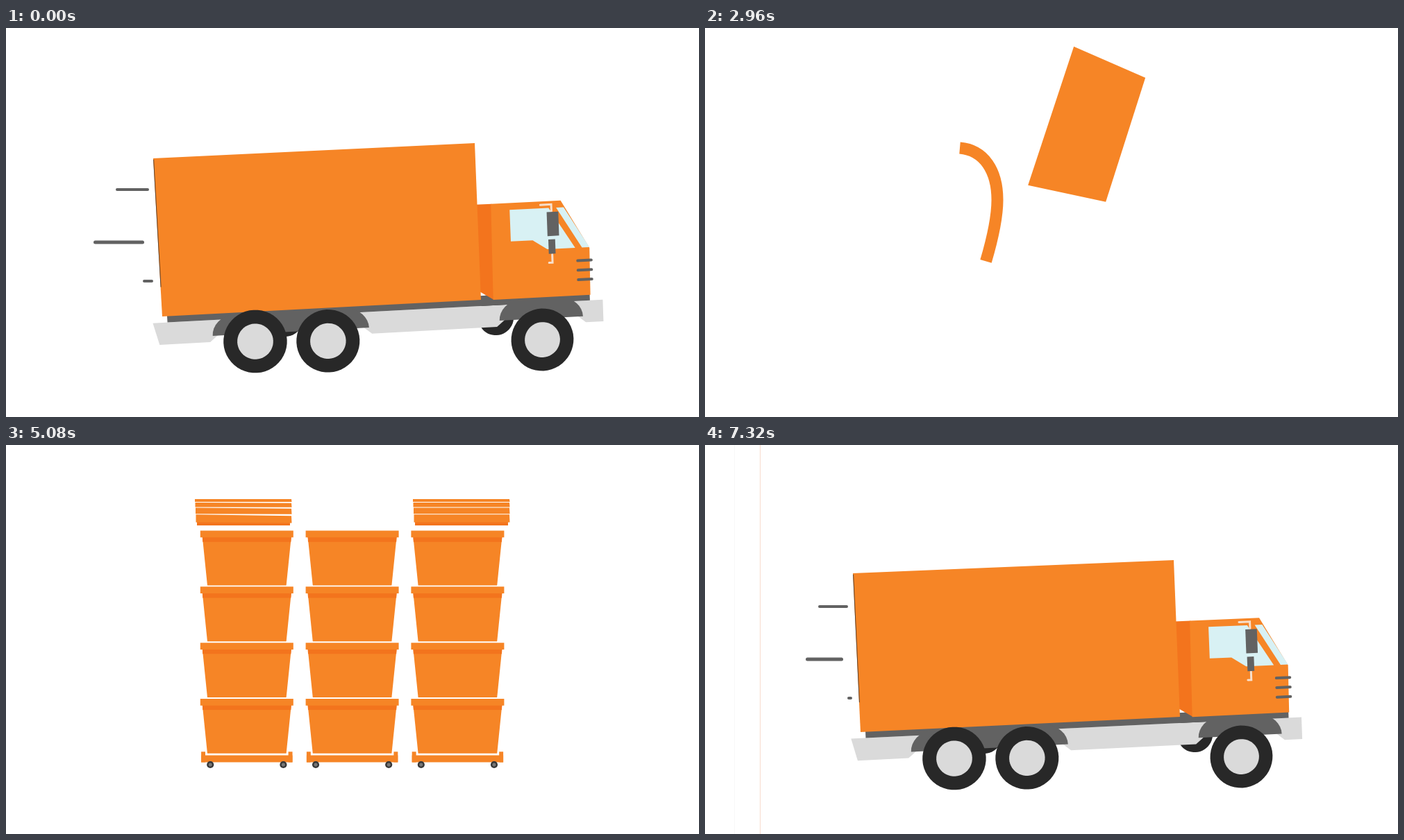
These frames come from a looping animation (998 by 561 pixels, 7.36 s). An HTML page with a canvas:

```html
<!DOCTYPE html>
<html lang="en">
<head>
<meta charset="utf-8">
<title>Moving day</title>
<style>
html, body { margin: 0; width: 100%; height: 100%; overflow: hidden; background: #fff; }
canvas { display: block; width: 998px; height: 561px; }
</style>
</head>
<body>
<canvas id="stage" width="998" height="561"></canvas>
<script>
const ctx = document.getElementById('stage').getContext('2d');
const W = 998, H = 561, LOOP = 7360, STEP = 40;
const ORANGE = '#f68526', DEEP = '#f3741d', DARK = '#282828', GREY = '#626262', PALE = '#dadada', GLASS = '#d8f1f4';

const clamp = v => Math.max(0, Math.min(1, v));
const span = (t, a, b) => clamp((t - a) / (b - a));
const mix = (a, b, p) => a + (b - a) * p;
const sine = p => (1 - Math.cos(Math.PI * p)) / 2;
const easeOut = p => 1 - (1 - p) ** 3;
const mixAll = (a, b, p) => a.map((q, i) => [mix(q[0], b[i][0], p), mix(q[1], b[i][1], p)]);

function poly(points, color) {
  ctx.beginPath();
  points.forEach(([x, y]) => ctx.lineTo(x, y));
  ctx.closePath();
  ctx.fillStyle = color;
  ctx.fill();
}

function line(points, color, width) {
  ctx.beginPath();
  points.forEach(([x, y]) => ctx.lineTo(x, y));
  ctx.strokeStyle = color;
  ctx.lineWidth = width;
  ctx.lineCap = 'round';
  ctx.stroke();
}

function disc(x, y, r, color) {
  ctx.beginPath();
  ctx.arc(x, y, r, 0, 7);
  ctx.fillStyle = color;
  ctx.fill();
}

function zoomAt(x, y, scale) {
  ctx.translate(x, y);
  ctx.scale(scale, scale);
  ctx.translate(-x, -y);
}

// Perspective map from a w by h rectangle to a quad
function project([[x0, y0], [x1, y1], [x2, y2], [x3, y3]], w = 1, h = 1) {
  const ax = x1 - x2, bx = x3 - x2, ay = y1 - y2, by = y3 - y2;
  const sx = x0 - x1 + x2 - x3, sy = y0 - y1 + y2 - y3;
  const den = ax * by - bx * ay;
  const g = (sx * by - bx * sy) / den, k = (ax * sy - sx * ay) / den;
  return ([x, y]) => {
    const u = x / w, v = y / h, z = g * u + k * v + 1;
    return [((x1 - x0 + g * x1) * u + (x3 - x0 + k * x3) * v + x0) / z,
            ((y1 - y0 + g * y1) * u + (y3 - y0 + k * y3) * v + y0) / z];
  };
}

const rect = (x, y, w, h) => [[x, y], [x + w, y], [x + w, y + h], [x, y + h]];
const circle = (x, y, r) => Array.from({ length: 48 }, (_, i) => {
  const a = i * Math.PI / 24;
  return [x + r * Math.cos(a), y + r * Math.sin(a)];
});

// Cargo box: size in truck units, and its side on the stage
const BOX_W = 463, BOX_H = 228;
const REST = [[212, 188], [675, 166], [684, 392], [225, 416]];
const TURN = [[371, 110], [984, 134], [975, 432], [374, 474]];
const EDGE = [[906, -40], [910, 20], [910, 540], [906, 600]];
const ARCHES = [[71, 298], [489, 612]];
const WHEELS = [132, 237.5, 551];

function arch([x0, x1]) {
  const pts = [];
  for (let a = 0; a <= 90; a += 10) {
    const r = a * Math.PI / 180;
    pts.push([x0 + 38 * (1 - Math.cos(r)), 260 - 31 * Math.sin(r)]);
  }
  return pts.concat(pts.map(([x, y]) => [x0 + x1 - x, y]).reverse());
}

// tilt: how far the body leans back over its wheels; lift: height of the tail
function truck(quad, tilt, lift) {
  const ground = project(quad, BOX_W, BOX_H);
  const [a, b, c, d] = quad;
  const body = project([[a[0] - lift / 3, a[1] + lift], b, c, [d[0] + lift / 3, d[1] + lift * .7]], BOX_W, BOX_H);
  const part = (color, pts) => poly(pts.map(body), color);
  const bar = (color, width, ...pts) => line(pts.map(body), color, width);
  const wheel = (x, r, color, up = 0) => {
    const y = 276.5 + tilt * .0475 * (x - 237) - up;
    poly(circle(x, y, r).map(ground), color);
  };

  const hide = 30 * (1 - tilt);
  wheel(177, 26, DARK, 33 + hide);
  wheel(484, 26, DARK, 33 + hide);
  part(DARK, circle(470, 231 - hide, 9));
  let from = -14;
  for (const [x0, x1] of [...ARCHES, [642, 0]]) {
    const last = x0 === 642;
    part(PALE, [[from, 237], [last ? x0 : x0 + 35, 237], [last ? x0 : x0 - 4, 269], [from < 0 ? -6 : from + 39, 269]]);
    from = x1 - 35;
  }
  part(GREY, rect(7, 222, 616, 15));
  ARCHES.forEach(s => part(GREY, arch(s)));

  part(DEEP, [[460, 89], [484, 89], [482, 229], [460, 215]]);
  part(ORANGE, [[483, 89], [585, 89], [625, 160], [624, 229], [481, 229]]);
  part(GLASS, [[510, 99], [567, 99], [604, 159], [563, 159], [542, 145], [510, 145]]);
  part(GLASS, [[578, 99], [589, 99], [625, 159], [614, 159]]);
  bar('#f7dfcb', 3, [555, 94], [571, 94], [571, 104]);
  bar('#f7dfcb', 3, [570, 167], [570, 179], [565, 179]);
  part(GREY, rect(564, 105, 17, 35));
  part(GREY, rect(565, 145, 10, 21));
  for (let y = 178; y < 210; y += 14) bar(GREY, 4, [607, y], [627, y]);
  part(ORANGE, rect(0, 0, BOX_W, BOX_H));
  bar('#5b4330', 1, [.5, 2], [.5, 185]);
  WHEELS.forEach(x => {
    wheel(x, 46, DARK);
    wheel(x, 26, PALE);
  });
}

function rear(quad, door) {
  const at = project(quad);
  const box = (u0, v0, u1, v1, color) => poly(rect(u0, v0, u1 - u0, v1 - v0).map(at), color);
  box(0, 0, 1, .035, ORANGE);
  box(0, .97, 1, 1, ORANGE);
  box(0, 0, .04, 1, ORANGE);
  box(.96, 0, 1, 1, ORANGE);
  if (door > 0) {
    const end = mix(.03, .975, door);
    box(.03, .03, .97, end, ORANGE);
    for (let v = end - .14; v > .05; v -= .14) box(.04, v, .96, v + .03, DEEP);
  }
  line([[.04, .035], [.96, .035], [.96, .97], [.04, .97]].map(at), '#3b3028', 1.5);
}

function crate(x, y, turn) {
  ctx.save();
  ctx.translate(x, y + 47);
  ctx.rotate(turn * Math.PI / 180);
  ctx.translate(0, -47);
  poly([[-75.5, 10], [75.5, 10], [67, 93], [-67, 93]], ORANGE);
  poly([[-75.5, 10], [75.5, 10], [75, 19], [-75, 19]], DEEP);
  poly(rect(-79, 0, 158, 11.5), ORANGE);
  ctx.restore();
}

function dolly(x, grow) {
  if (grow <= 0) return;
  ctx.save();
  ctx.translate(x, 108);
  ctx.scale(grow, grow);
  poly(rect(-77.5, -12, 155, 12), ORANGE);
  for (const side of [-1, 1]) {
    poly(rect(side * 74 - 3.5, -18, 7, 18), ORANGE);
    disc(side * 62, 4, 6, '#383838');
    disc(side * 62, 4, 3, '#777');
  }
  ctx.restore();
}

// Crates land bottom first, then at even gaps
const COLUMNS = [
  { x: -179, first: 3975, next: 4073, gap: 98, swing: 3 },
  { x: 0, first: 3420, next: 3853, gap: 8, swing: 5.4 },
  { x: 179, first: 4068, next: 4166, gap: 98, swing: 3 }
];

function stacks(t, scale) {
  ctx.save();
  ctx.translate(498.6, 366);
  ctx.scale(scale, scale);
  for (const { x, first, next, gap, swing } of COLUMNS) {
    dolly(x, easeOut(span(t, first - 185, first)));
    for (let i = 3; i >= 0; i--) {
      const left = Math.max(0, (i ? next + gap * (i - 1) : first) - t);
      if (left > 560) continue;
      const turn = x || i > 1 ? swing * Math.sin(left / 426 * Math.PI * 2) : 0;
      crate(x, -95.3 * i - 700 * (left / 500) ** 2, -turn);
    }
  }
  ctx.restore();
}

function slats(x, lean) {
  poly(rect(x + 3, 109, 134, 7), DEEP);
  for (let i = 0, y = 78; i < 4; i++) {
    const h = 4 + 2.4 * i, skew = lean * i / 3;
    poly([[x + i / 2, y], [x + 139, y + skew], [x + 139.5, y + h + skew / 2], [x + i / 2, y + h]], ORANGE);
    y += h + 1;
  }
}

function handCart(t) {
  const far = 1 - easeOut(span(t, 1320, 1920));
  const leave = span(t, 2860, 3180) ** 2;
  const slide = sine(span(t, 1920, 2760)) * .57 + leave * 1.7;

  ctx.save();
  ctx.translate(-560 * far - 3 * span(t, 1920, 2100), -400 * leave);
  zoomAt(400, 290, 1 + 1.5 * far);
  ctx.beginPath();
  ctx.moveTo(370, 212);
  ctx.bezierCurveTo(405, 215, 424, 245, 424, 287);
  ctx.bezierCurveTo(424, 316, 415, 350, 407.5, 375.5);
  ctx.strokeStyle = ORANGE;
  ctx.lineWidth = 17;
  ctx.lineCap = 'butt';
  ctx.stroke();
  ctx.restore();

  ctx.save();
  ctx.translate(620 * far + 60 * slide, -200 * slide);
  zoomAt(505, 290, 1 + 1.5 * far);
  poly([[487, 174], [590, 219], [533, 398], [421, 374]], ORANGE);
  ctx.restore();
}

function speedLine(x0, x1, y, width) {
  if (x1 - x0 > width) line([[x0 + width / 2, y], [x1 - width / 2, y]], GREY, width);
}

function driveOff(t) {
  const go = 640 * (Math.max(0, t - 80) / 680) ** 2;
  const grow = span(t, 0, 60), late = span(t, 760, 1040);
  const trail = 126 - 27 * grow + 699 * span(t, 60, 760) ** 2 + 143 * late;
  const end = t < 760 ? 199 + go : mix(839, 966, late);
  if (t < 920) {
    speedLine(158 - 8 * grow + go, 206 + go, 233, 4);
    ctx.save();
    ctx.translate(go, 0);
    truck(REST, 1, 0);
    ctx.restore();
  }
  speedLine(trail, Math.max(end, trail + 22), 309, 5);
  speedLine(Math.max(197 - 12 * grow + go, trail + 47) * (1 - late) + 988 * late, 212 + go, 365, 4);
}

function load(t) {
  const scale = mix(.848, .6, sine(span(t, 5120, 5880)));
  const z = scale / .6;
  stacks(t, scale);
  rear(rect(499 - 407 * z, 366 - 406 * z, 814 * z, 640 * z), sine(span(t, 5300, 5800)));
}

function turnAround(t) {
  const first = t < 6360;
  const p = first ? span(t, 5880, 6360) ** 1.6 : 1 - (1 - span(t, 6360, 6900)) ** 2;
  const side = first ? mixAll(EDGE, TURN, p) : mixAll(TURN, REST, p);
  const corner = [[350, 152], [353, 400]];
  const [top, bottom] = first
    ? mixAll([[92, -40], [92, 600]], corner, p)
    : mixAll(corner, [REST[0], REST[3]], p);
  const tilt = first ? 0 : p;

  poly(rect(79, 0, 1, H), '#f8dccd');
  poly(rect(42, 0, 1, H), '#f8f8f8');
  if (t > 6280 && t < 6640) {
    const k = 1 - tilt;
    poly([[-15, 7], [1, 7], [12, 40], [-8, 40]].map(([x, y]) => [bottom[0] + x * k, bottom[1] + y * k]), '#7d7f7e');
  }
  truck(side, tilt, -Math.min(12 * tilt, (LOOP - t) * .075));
  if (side[0][0] - top[0] > 2) rear([top, side[0], side[3], bottom], 1);

  speedLine(206 - 43 * span(t, 7080, 7320), 206, 233, 4);
  speedLine(199 - 54 * span(t, 7206, 7320), 199, 309, 5);
  speedLine(212 - 7 * span(t, 7280, 7320), 212, 365, 4);
}

function draw(t) {
  poly(rect(0, 0, W, H), '#fff');
  if (t < 1360) driveOff(Math.min(t, 1040));
  else if (t < 5120) {
    if (t < 3200) handCart(t);
    if (t >= 2880) stacks(t, mix(1.4, .848, sine(span(t, 3330, 3990))));
    if (t >= 4400) {
      slats(272, 2);
      slats(586, 0);
    }
  }
  else if (t < 5880) load(t);
  else turnAround(t);
}

let start;
function frame(now) {
  start ??= now;
  draw(Math.floor((now - start) % LOOP / STEP) * STEP);
  requestAnimationFrame(frame);
}
draw(0);
requestAnimationFrame(frame);
</script>
</body>
</html>
```
